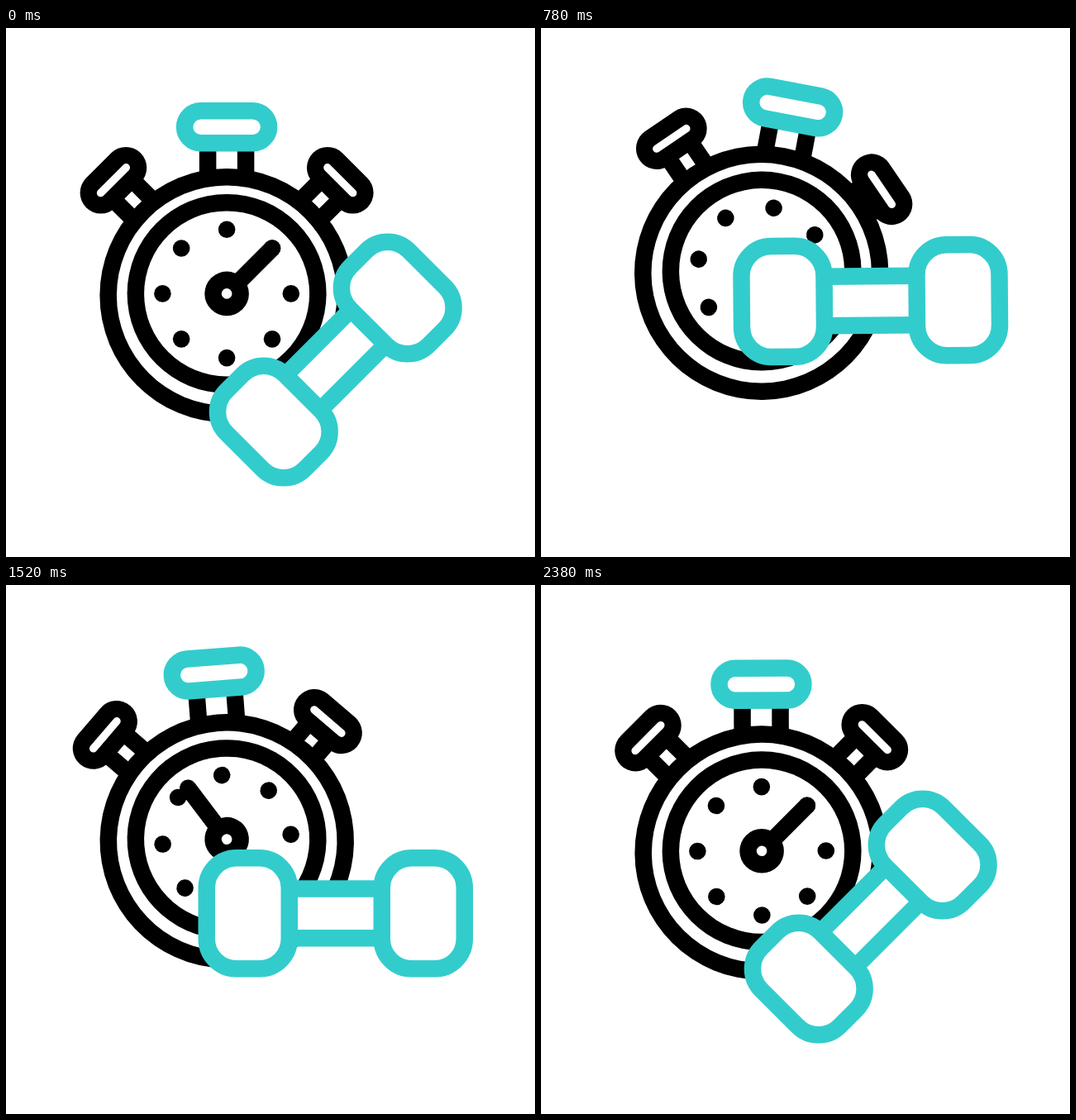
Animation, 640 px wide and 640 px high, one loop 2.4 s. Source, as an HTML page with a canvas:

```html
<!DOCTYPE html>
<html lang="en">
<head>
<meta charset="utf-8">
<title>Workout timer</title>
<style>
  html, body { margin: 0; width: 100%; height: 100%; overflow: hidden; background: #fff; }
  canvas { display: block; width: 640px; height: 640px; }
</style>
</head>
<body>
<canvas id="stage" width="640" height="640"></canvas>
<script>
const ctx = document.getElementById('stage').getContext('2d');
const LOOP = 2400, TEAL = '#33cccc', BLACK = '#000', WHITE = '#fff', LINE = 20.5;
const TAU = Math.PI * 2, rad = deg => deg * Math.PI / 180;

// Keys are [time, value] pairs, eased in and out between neighbours.
const watchY = [[0, 321.4], [360, 373.4], [720, 286.5], [1058, 375], [1425, 301.3],
  [1780, 336.5], [2050, 320.3], [2370, 322], [2400, 321.4]];
const watchTurn = [[0, 0], [400, -17.9], [857, 13], [1345, -8.4], [1795, 3.45], [2370, -0.27], [2400, 0]];
const buttonPress = [[0, 0], [480, 20.3], [2120, 0]];
const bellY = [[0, 401.5], [370, 402], [820, 328.5], [1070, 438], [1335, 325], [1600, 417], [2300, 401.5]];
const bellTurn = [[0, -45], [833, 0], [1600, 0], [2300, -45]];

const smooth = x => x * x * (3 - 2 * x);

function at(keys, t) {
  for (let i = 1; i < keys.length; i++) {
    const [t0, a] = keys[i - 1], [t1, b] = keys[i];
    if (t <= t1) return a + (b - a) * smooth((t - t0) / (t1 - t0));
  }
  return keys[keys.length - 1][1];
}

// Strong ease, the curve of cubic-bezier(.8, 0, .2, 1).
function strongEase(x) {
  if (x >= 1) return 1;
  let lo = 0, hi = 1;
  for (let i = 0; i < 30; i++) {
    const u = (lo + hi) / 2, v = 1 - u;
    if (2.4 * v * v * u + 0.6 * v * u * u + u * u * u < x) lo = u; else hi = u;
  }
  return smooth(lo);
}

function group(x, y, deg, draw) {
  ctx.save();
  ctx.translate(x, y);
  ctx.rotate(rad(deg));
  draw();
  ctx.restore();
}

function line(x0, y0, x1, y1, color, width = LINE, cap = 'butt') {
  ctx.strokeStyle = color;
  ctx.lineWidth = width;
  ctx.lineCap = cap;
  ctx.beginPath();
  ctx.moveTo(x0, y0);
  ctx.lineTo(x1, y1);
  ctx.stroke();
}

function disc(x, y, r, color) {
  ctx.fillStyle = color;
  ctx.beginPath();
  ctx.arc(x, y, r, 0, TAU);
  ctx.fill();
}

function ring(y, outer) {
  disc(0, y, outer, BLACK);
  disc(0, y, outer - LINE, WHITE);
}

// Rounded box outlined in teal, centred on x, y; size is that of the line's middle.
function tealBox(x, y, w, h, r) {
  ctx.beginPath();
  ctx.roundRect(x - w / 2, y - h / 2, w, h, r);
  ctx.fillStyle = WHITE;
  ctx.fill();
  ctx.strokeStyle = TEAL;
  ctx.lineWidth = LINE;
  ctx.stroke();
}

function sideButton(deg, press) {
  group(0, 0, deg, () => {
    const y = press - 194;
    for (const x of [-16.5, 16.5]) line(x, y, x, -141, BLACK);
    line(-21.4, y, 21.4, y, BLACK, 50.4, 'round');
    line(-21.8, y, 21.8, y, WHITE, 9.4, 'round');
  });
}

function drawWatch(press, handTurn) {
  for (const x of [-23, 23]) line(x, -180, x, -140, BLACK);
  ring(2.2, 153.7);
  sideButton(-45, 0);
  sideButton(45, press);
  tealBox(0, -201.7, 102, 39, 19.5);
  ring(0, 120.5);
  for (let i = 0; i < 8; i++) {
    const a = i * TAU / 8;
    disc(77.7 * Math.sin(a), -77.7 * Math.cos(a), 10.3, BLACK);
  }
  group(0, 0, handTurn, () => line(0, 0, 0, -77.7, BLACK, LINE, 'round'));
  disc(0, 0, 26.8, BLACK);
  disc(0, 0, 6.3, WHITE);
}

function drawDumbbell() {
  ctx.fillStyle = WHITE;
  ctx.fillRect(-56, -30, 112, 60);
  for (const y of [-29.8, 29.8]) line(-56, y, 56, y, TEAL);
  for (const x of [-106, 106]) tealBox(x, 0, 100, 134, 36);
}

function frame(now) {
  const t = now % LOOP;
  ctx.fillStyle = WHITE;
  ctx.fillRect(0, 0, 640, 640);
  const handTurn = 45 + 720 * strongEase(t / 2300);
  group(267.1, at(watchY, t), at(watchTurn, t), () => drawWatch(at(buttonPress, t), handTurn));
  group(398.75, at(bellY, t), at(bellTurn, t), drawDumbbell);
}

const start = performance.now();
function tick() {
  frame(performance.now() - start);
  requestAnimationFrame(tick);
}
tick();
</script>
</body>
</html>
```
